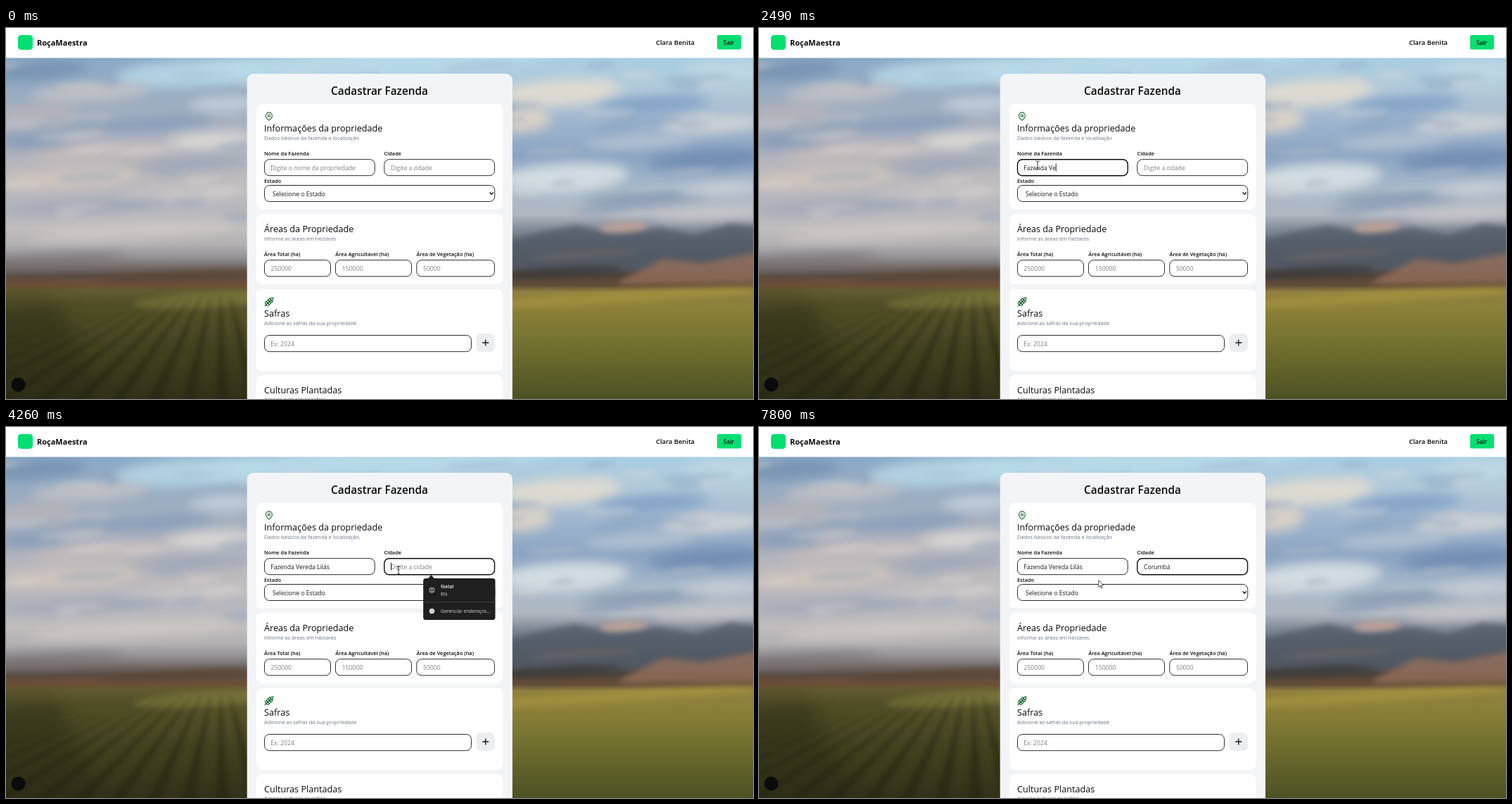
Write an HTML page with a canvas that moves like this. It is 1062 by 527 pixels and loops after 8000 ms.

```html
<!DOCTYPE html>
<html lang="pt-BR">
<head>
<meta charset="utf-8">
<title>Cadastrar Fazenda</title>
<style>
  html, body { margin: 0; width: 100%; height: 100%; overflow: hidden; background: #fff; }
  canvas, svg { position: absolute; left: 0; top: 0; width: 1062px; height: 527px; display: block; }
  text { font-family: "Open Sans", "Noto Sans", sans-serif; fill: #0a0a0a; white-space: pre; }
  .brand { font-size: 11px; font-weight: 700; }
  .user { font-size: 9.4px; font-weight: 600; }
  .exit { font-size: 8.2px; font-weight: 600; }
  .title { font-size: 15.35px; font-weight: 600; }
  .head { font-size: 12.65px; }
  .sub { font-size: 7.42px; fill: #6a7282; }
  .label { font-size: 7.4px; font-weight: 600; }
  .field { font-size: 8.62px; fill: #1a1a1a; }
  .hint { fill: #808080; }
  .card { fill: #fff; }
  .box { fill: #fff; stroke: #2a2a2a; stroke-width: 1; }
  .box.on { stroke: #0c0c0c; stroke-width: 1.4; }
  .icon { fill: none; stroke: #1f6b35; stroke-width: 2; stroke-linecap: round; stroke-linejoin: round; }
  .caret { fill: #111; }
  .popup text { font-size: 6.75px; fill: #d6d6d6; }
  .popup .strong { font-size: 7.1px; font-weight: 600; fill: #eee; }
</style>
</head>
<body>
<canvas id="sky" width="1062" height="527"></canvas>
<svg viewBox="0 0 1062 527" width="1062" height="527">
  <rect width="1062" height="42.5" fill="#fff"/>
  <rect x="17" y="10" width="21" height="21" rx="4.5" fill="#05df72"/>
  <text class="brand" x="44" y="24.5">RoçaMaestra</text>
  <text class="user" x="924" y="23.8">Clara Benita</text>
  <rect x="1011" y="10" width="34" height="20.5" rx="2.5" fill="#05df72"/>
  <text class="exit" x="1020" y="23.5">Sair</text>

  <path d="M342.7 527V74a9 9 0 0 1 9-9H711a9 9 0 0 1 9 9V527Z" fill="#f3f4f6"/>
  <text class="title" x="531" y="95" text-anchor="middle">Cadastrar Fazenda</text>
  <g class="card">
    <rect x="356" y="108" width="350.5" height="149.5" rx="8"/>
    <rect x="356" y="264" width="350.5" height="100" rx="8"/>
    <rect x="356" y="371" width="350.5" height="116" rx="8"/>
    <rect x="356" y="493" width="350.5" height="60" rx="8"/>
  </g>

  <g class="icon" transform="translate(367.2 118.8) scale(.56)">
    <path d="M20 10c0 6-8 12-8 12s-8-6-8-12a8 8 0 0 1 16 0Z"/>
    <circle cx="12" cy="10" r="3"/>
  </g>
  <text class="head" x="367" y="147">Informações da propriedade</text>
  <text class="sub" x="367" y="158.8">Dados básicos da fazenda e localização</text>
  <text class="label" x="367" y="180.7">Nome da Fazenda</text>
  <text class="label" x="537.5" y="180.7">Cidade</text>
  <rect id="nameBox" class="box" x="367.5" y="186.7" width="156.8" height="23" rx="7"/>
  <rect id="cityBox" class="box" x="537.8" y="186.7" width="156.8" height="23" rx="7"/>
  <text id="nameText" class="field" x="376.3" y="201.5"></text>
  <text id="cityText" class="field" x="547" y="201.5"></text>
  <text class="label" x="367" y="219.9">Estado</text>
  <rect class="box" x="367.5" y="223.5" width="327.3" height="23" rx="7"/>
  <text class="field" x="379" y="238.6">Selecione o Estado</text>
  <path d="M687.6 233.6l2.6 2.6l2.6-2.6" fill="none" stroke="#111" stroke-width="1.4"/>

  <text class="head" x="367" y="290.3">Áreas da Propriedade</text>
  <text class="sub" x="367" y="301.8">Informe as áreas em hectares</text>
  <text class="label" x="367" y="323.8">Área Total (ha)</text>
  <text class="label" x="468.3" y="323.8">Área Agricultável (ha)</text>
  <text class="label" x="583.5" y="323.8">Área de Vegetação (ha)</text>
  <rect class="box" x="367.5" y="329.7" width="94" height="23.2" rx="7"/>
  <rect class="box" x="468.5" y="329.7" width="108" height="23.2" rx="7"/>
  <rect class="box" x="583.8" y="329.7" width="110.7" height="23.2" rx="7"/>
  <text class="field hint" x="376.5" y="344.8">250000</text>
  <text class="field hint" x="477.8" y="344.8">150000</text>
  <text class="field hint" x="593" y="344.8">50000</text>

  <g class="icon" transform="translate(367 382) scale(.58)">
    <path d="M2 22 16 8M20 2h2v2a4 4 0 0 1-4 4h-2V6a4 4 0 0 1 4-4Z"/>
    <g id="grain">
      <path d="M3.47 12.53 5 11l1.53 1.53a3.5 3.5 0 0 1 0 4.94L5 19l-1.53-1.53a3.5 3.5 0 0 1 0-4.94Z"/>
      <path d="M11.47 17.47 13 19l-1.53 1.53a3.5 3.5 0 0 1-4.94 0L5 19l1.53-1.53a3.5 3.5 0 0 1 4.94 0Z"/>
    </g>
    <use href="#grain" x="4" y="-4"/>
    <use href="#grain" x="8" y="-8"/>
  </g>
  <text class="head" x="367" y="410">Safras</text>
  <text class="sub" x="367" y="422">Adicione as safras da sua propriedade</text>
  <rect class="box" x="367.5" y="436.5" width="294" height="23.2" rx="7"/>
  <text class="field hint" x="376.3" y="451.5">Ex: 2024</text>
  <rect x="668.5" y="434" width="26.5" height="26" rx="7" fill="#eceef0"/>
  <path d="M677.3 447h9M681.8 442.5v9" stroke="#111" stroke-width="1.3"/>

  <text class="head" x="367" y="519">Culturas Plantadas</text>
  <text class="sub" x="367" y="530.2">Associe culturas às safras</text>

  <circle cx="17.5" cy="506.5" r="10" fill="#0b0b0b"/>

  <rect id="caret" class="caret" y="192.5" width="0.9" height="11"/>
  <g id="popups"></g>
  <path id="beam" d="M-2.6-5.8Q0-5.8 0-4.2V4.2Q0 5.8-2.6 5.8M2.6-5.8Q0-5.8 0-4.2M0 4.2Q0 5.8 2.6 5.8"
        fill="none" stroke="#222" stroke-width=".9"/>
  <path id="arrow" d="M0 0V9.6L2.2 7.6L3.7 11.2L5.3 10.5L3.8 7.1H6.8Z" fill="#fff" stroke="#222" stroke-width=".8"/>
</svg>
<script>
const $ = id => document.getElementById(id);

// ---- blurred landscape ----
const ctx = $('sky').getContext('2d');

function fade(x, w, stops) {
  const g = ctx.createLinearGradient(0, 42, 0, 527);
  for (const [y, color] of stops) g.addColorStop((y - 42) / 485, color);
  ctx.fillStyle = g;
  ctx.fillRect(x, 42, w, 485);
}

function blob(x, y, rx, ry, color, alpha = 0.8) {
  ctx.globalAlpha = alpha;
  ctx.fillStyle = color;
  ctx.beginPath();
  ctx.ellipse(x, y, rx, ry, -0.06, 0, 7);
  ctx.fill();
  ctx.globalAlpha = 1;
}

function shape(color, alpha, ...pts) {
  ctx.globalAlpha = alpha;
  ctx.fillStyle = color;
  ctx.beginPath();
  for (const [x, y] of pts) ctx.lineTo(x, y);
  ctx.fill();
  ctx.globalAlpha = 1;
}

let seed = 11;
const rand = () => (seed = seed * 16807 % 2147483647) / 2147483647;

function landscape() {
  fade(0, 531, [[42, '#8aaac7'], [90, '#98acc3'], [130, '#a5b0c0'], [170, '#adb2be'], [210, '#bebabc'],
    [250, '#b5b6be'], [285, '#c1bdbd'], [308, '#b3b0b2'], [324, '#97959a'], [338, '#77706e'],
    [352, '#5a4c42'], [364, '#6e4f39'], [373, '#625a31'], [400, '#545329'], [460, '#42411f'], [527, '#323119']]);
  fade(531, 531, [[42, '#a8cee3'], [90, '#b4cad9'], [130, '#a0b7cf'], [180, '#8ba4c2'], [230, '#a9bbcb'],
    [265, '#b1b6c0'], [285, '#858d9a'], [310, '#5f6772'], [335, '#54555a'], [350, '#4d433b'],
    [366, '#644e38'], [375, '#8f8040'], [400, '#8c8038'], [450, '#71702f'], [527, '#4d5123']]);

  ctx.filter = 'blur(8px)';
  blob(531, 48, 260, 22, '#b6d8e7', 1);
  blob(265, 64, 110, 20, '#badbe9');
  blob(40, 60, 75, 14, '#7590af');
  blob(120, 92, 85, 12, '#cbc6c6');
  blob(45, 120, 60, 10, '#bdb5b5');
  blob(310, 108, 50, 12, '#c9d3dc');
  blob(215, 136, 80, 9, '#7f99ba');
  blob(290, 160, 65, 13, '#e2dcd6');
  blob(140, 176, 110, 11, '#cbbfbb');
  blob(35, 163, 50, 8, '#8199b8');
  blob(260, 194, 80, 7, '#909fb7');
  blob(90, 214, 100, 14, '#d2c7bf');
  blob(260, 236, 100, 11, '#cdc8c7');
  blob(110, 254, 120, 7, '#98a2b4');
  blob(180, 288, 150, 11, '#cfcac5');
  blob(60, 332, 110, 8, '#787273');

  blob(1020, 62, 60, 16, '#c3dae4');
  blob(790, 92, 85, 19, '#e9dfd0');
  blob(735, 130, 40, 18, '#e6d7c6');
  blob(920, 108, 80, 12, '#7a9dc5');
  blob(1005, 137, 75, 13, '#dbd9d8');
  blob(900, 162, 80, 9, '#bcc8d5');
  blob(1000, 188, 90, 13, '#6b88af');
  blob(795, 212, 90, 20, '#dfe7e9');
  blob(910, 243, 90, 8, '#7c92ae');
  blob(1015, 228, 60, 9, '#d3d4d7');
  blob(1000, 263, 80, 9, '#cfcbca');

  // streaky cloud texture
  ctx.filter = 'blur(4px)';
  for (let i = 0; i < 90; i++) {
    blob(rand() * 1062, 50 + rand() * 220, 15 + rand() * 35, 2 + rand() * 5,
      rand() < 0.55 ? '#e2dcd8' : '#7c96b6', 0.28);
  }

  // hills
  shape('#525b67', 0.8, [700, 306], [760, 290], [810, 280], [860, 292], [930, 284], [980, 294],
    [1030, 278], [1080, 284], [1080, 345], [700, 345]);
  blob(878, 283, 34, 7, '#c9a497');
  blob(820, 322, 80, 5, '#6e6a62', 0.6);
  shape('#96705a', 0.8, [880, 355], [935, 328], [990, 334], [1080, 316], [1080, 362], [870, 364]);
  blob(790, 347, 85, 7, '#3d3b3b');
  blob(250, 352, 120, 6, '#5c4636');

  // fields
  blob(290, 386, 110, 11, '#7f7b3c', 0.7);
  blob(880, 382, 220, 8, '#a8943f', 0.7);
  ctx.filter = 'blur(14px)';
  shape('#2c2b17', 0.45, [-40, 385], [70, 385], [150, 560], [-40, 560]);
  ctx.filter = 'blur(3px)';
  for (let i = 0; i < 16; i++) {
    const x = 345 - i * 46 - i * i;
    const top = 318 - i * 14;
    shape('#1f2010', 0.42, [top, 382], [top + 2, 382], [x + 19, 535], [x, 535]);
  }
  ctx.filter = 'none';
}
landscape();

// ---- autofill lists ----
function popup(id, x, w, tip, main, detail) {
  return `<g id="${id}" class="popup" transform="translate(${x} 0)">
    <path d="M${tip - 5} 216l5-6l5 6Z" fill="#1f1f1f"/>
    <rect y="215" width="${w}" height="59" rx="3.5" fill="#1f1f1f"/>
    <path d="M0 248.6H${w}" stroke="#4a4a4a" stroke-width=".8"/>
    <g fill="none" stroke="#d0d0d0" stroke-width=".9">
      <circle cx="12.3" cy="231.7" r="3.6"/><circle cx="12.3" cy="230.7" r="1.1"/>
      <path d="M9.9 234.2q2.4-2 4.8 0"/>
    </g>
    <circle cx="12.3" cy="261.6" r="3.8" fill="#d0d0d0"/>
    <text class="strong" x="24.8" y="229.3">${main}</text>
    <text x="24.8" y="240.3">${detail}</text>
    <text x="24.8" y="264">Gerenciar endereços...</text>
  </g>`;
}
$('popups').innerHTML =
  popup('namePopup', 422.2, 136, 12, 'LAURA CELIA MONTEVALO DE...', 'Natal') +
  popup('cityPopup', 593.2, 102.4, 11.3, 'Natal', 'RN');

// ---- timeline ----
const LOOP = 8000;
const FARM = 'Fazenda Vereda Lilás';
const steps = [
  [0, { name: '', city: '', focus: '', caret: 0, list: 0, x: 0, y: 0, mouse: '' }],
  [250, { mouse: 'beam', x: 681, y: 340 }],
  [500, { mouse: 'arrow', x: 592, y: 296 }],
  [750, { x: 492, y: 243 }],
  [990, { mouse: 'beam', x: 420, y: 205 }],
  [1240, { x: 396, y: 195 }],
  [1990, { focus: 'name', list: 1 }],
  [2240, { caret: 1 }],
  [2490, { name: FARM.slice(0, 10), list: 0 }],
  [2740, { name: FARM }],
  [2990, { caret: 0 }],
  [3260, { caret: 1, x: 408, y: 196 }],
  [3510, { x: 468, y: 199 }],
  [3760, { caret: 0, x: 545, y: 203 }],
  [4010, { x: 558, y: 203.5 }],
  [4260, { focus: 'city', caret: 1, list: 1 }],
  [4760, { city: 'C', list: 0.93 }],
  [5010, { city: 'Co', list: 0 }],
  [5260, { city: 'Cor' }],
  [5520, { city: 'Coru' }],
  [5770, { city: 'Corum' }],
  [6020, { city: 'Corumv' }],
  [6530, { city: 'Corum' }],
  [6770, { city: 'Corumb' }],
  [7280, { city: 'Corumbá' }],
  [7800, { caret: 0, mouse: 'arrow', x: 482.8, y: 217.8 }]
];

const hints = { name: 'Digite o nome da propriedade', city: 'Digite a cidade' };

function render(s) {
  for (const key of ['name', 'city']) {
    const text = $(key + 'Text');
    text.textContent = s[key] || hints[key];
    text.classList.toggle('hint', !s[key]);
    const on = s.focus === key;
    $(key + 'Box').classList.toggle('on', on);
    $(key + 'Popup').setAttribute('opacity', on ? s.list : 0);
    if (on) {
      const width = s[key] ? text.getComputedTextLength() : 0;
      $('caret').setAttribute('x', +text.getAttribute('x') + width);
    }
  }
  $('caret').setAttribute('opacity', s.caret);
  for (const kind of ['beam', 'arrow']) {
    $(kind).setAttribute('opacity', s.mouse === kind ? 1 : 0);
    $(kind).setAttribute('transform', `translate(${s.x} ${s.y})`);
  }
}

const start = performance.now();
function tick() {
  const t = (performance.now() - start) % LOOP;
  const state = {};
  for (const [at, change] of steps) if (at <= t) Object.assign(state, change);
  render(state);
  requestAnimationFrame(tick);
}
tick();
</script>
</body>
</html>
```
